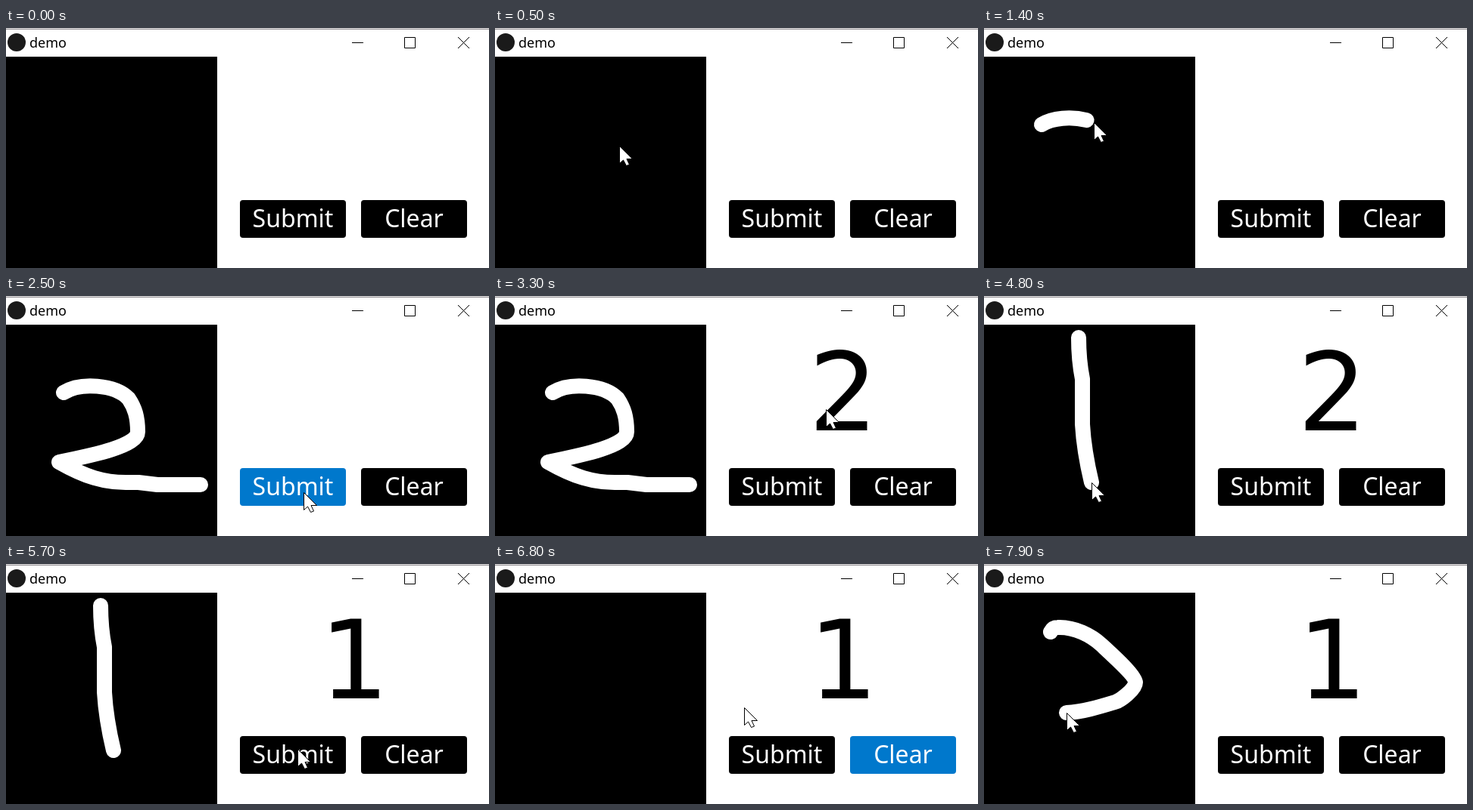
An HTML page that plays this animation: 638x318 px, repeating every 8 s.

```html
<!DOCTYPE html>
<html lang="en">
<head>
<meta charset="utf-8">
<title>demo</title>
<style>
  html, body { margin: 0; width: 100%; height: 100%; overflow: hidden; background: #fff; }
  svg { display: block; width: 638px; height: 318px; }
  text { font-family: "Noto Sans", sans-serif; }
  .button rect { width: 140px; height: 50px; rx: 4px; }
  .button text { font-size: 32px; fill: #fff; text-anchor: middle; }
  #digit { font: 144px "DejaVu Sans", sans-serif; text-anchor: middle; }
  #ink { fill: none; stroke: #fff; stroke-width: 20; stroke-linecap: round; stroke-linejoin: round; }
</style>
</head>
<body>
<svg viewBox="0 0 638 318">
  <rect width="638" height="1" fill="#e8e6e8"/>
  <rect y="1" width="638" height="1" fill="#8a878a"/>
  <circle cx="14" cy="19" r="12" fill="#1a1a1a"/>
  <text x="31" y="26" font-size="18">demo</text>
  <path d="M457 19.5h15M526.5 12.5h14v14h-14zM597 12l15 15M612 12l-15 15" fill="none" stroke="#000"/>
  <rect y="38" width="279" height="280"/>
  <g id="ink"></g>
  <text id="digit" x="460" y="178"></text>
  <g class="button" transform="translate(309 228)"><rect id="submit"/><text x="70" y="36">Submit</text></g>
  <g class="button" transform="translate(469 228)"><rect id="clear"/><text x="70" y="36">Clear</text></g>
  <path id="cursor" d="M0 0V23L5 18.5L9 26L13 24.5L9.5 17H17Z" fill="#fff" stroke="#000"/>
</svg>
<script>
const LOOP = 8000, STEP = 100;
const LAG = 28; // the ink trails the pointer slightly
const $ = id => document.getElementById(id);

const acts = [];
let tip = { x: 300, y: 200 };

function addPath(from, to, d) {
  const path = document.createElementNS("http://www.w3.org/2000/svg", "path");
  path.setAttribute("d", d);
  const length = path.getTotalLength();
  tip = path.getPointAtLength(length);
  const act = { from, to, path, length };
  acts.push(act);
  return act;
}

const glide = (from, to, x, y) => addPath(from, to, `M${tip.x} ${tip.y}L${x} ${y}`);

function stroke(from, to, erase, d) {
  const act = addPath(from, to, d);
  act.erase = erase;
  $("ink").append(act.path);
}

glide(100, 800, 76, 128);
stroke(1210, 2390, 4000, `M76 128C98 114 144 117 162 136C170 148 174 160 174 180
  C174 198 120 210 70 220C105 240 130 247 158 247H175L200 250H257`);
glide(2390, 2500, 393, 260);
glide(2700, 3000, 437, 150);
glide(3400, 3750, 525, 248);
glide(4030, 4310, 125, 55);
stroke(4330, 4740, 6500, "M125 55Q125 85 130 110V170Q132 205 142 247");
glide(4830, 5150, 385, 245);
glide(5700, 6450, 510, 270);
glide(6550, 6800, 329, 190);
glide(6850, 7200, 88, 90);
stroke(7230, 7840, LOOP, `M88 90Q91 84 97 84C120 83 142 95 155 107
  C170 121 200 148 200 157C200 166 180 181 173 183C150 190 130 196 109 197`);

const progress = (act, t) => Math.min(1, Math.max(0, (t - act.from) / (act.to - act.from)));
const smooth = p => p * p * (3 - 2 * p);

function pointer(t) {
  const act = acts.filter(a => a.from <= t).pop() || acts[0];
  const p = progress(act, t);
  return act.path.getPointAtLength(act.length * (act.erase ? p : smooth(p)));
}

function drawInk(act, t) {
  const shown = t - LAG >= act.from && t < act.erase;
  act.path.setAttribute("visibility", shown ? "visible" : "hidden");
  act.path.setAttribute("stroke-dasharray", `${act.length * progress(act, t - LAG)} ${act.length + 1}`);
}

const within = (t, ...spans) => spans.some(([a, b]) => t >= a && t < b);
const paint = (id, lit) => $(id).setAttribute("fill", lit ? "#0078cc" : "#000");

function draw(t) {
  acts.filter(a => a.erase).forEach(a => drawInk(a, t));
  $("digit").textContent = t < 3100 ? "" : t < 5700 ? "2" : "1";
  paint("submit", within(t, [2450, 3100], [5050, 5700]));
  paint("clear", within(t, [3700, 4200], [6400, 6850]));
  const { x, y } = pointer(t);
  $("cursor").setAttribute("visibility", t < 100 ? "hidden" : "visible");
  $("cursor").setAttribute("transform", `translate(${Math.round(x) + 0.5} ${Math.round(y) + 0.5})`);
}

const begin = performance.now();
function tick() {
  const t = (performance.now() - begin + 4) % LOOP;
  draw(Math.floor(t / STEP) * STEP);
  requestAnimationFrame(tick);
}
tick();
</script>
</body>
</html>
```
